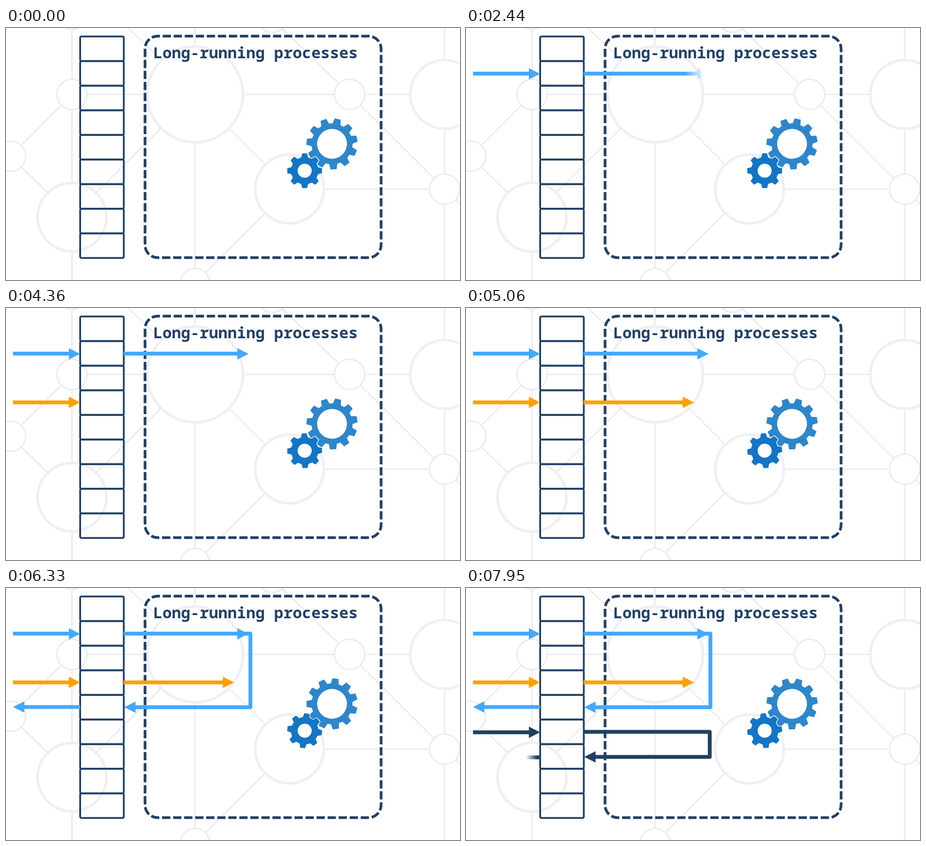
An HTML page for the animation above (8 s loop, 1004 by 558 pixels).

```html
<!DOCTYPE html>
<html lang="en">
<head>
<meta charset="utf-8">
<title>Long-running processes</title>
<style>
  html, body { margin: 0; width: 100%; height: 100%; overflow: hidden; background: #fff; }
  svg { display: block; width: 100%; height: 100%; }
  text { font: bold 34.3px "Noto Sans Mono", "DejaVu Sans Mono", monospace; }
</style>
</head>
<body>
<svg id="stage" viewBox="0 0 1004 558">
  <defs id="defs"></defs>
  <g id="net" fill="none" stroke="#ebebee" stroke-width="3"></g>
  <g id="cells" fill="none" stroke="#214166" stroke-width="4"></g>
  <path d="M307.5 46V480.500a28 28 0 0 0 28 28H801.500a28 28 0 0 0 28-28V46a28 28 0 0 0-28-28H335.500a28 28 0 0 0-28 28Z"
        fill="none" stroke="#214166" stroke-width="6" pathLength="324" stroke-dasharray="3 1"/>
  <text x="325.300" y="67" fill="#214166">Long-running processes</text>
  <g id="gears"></g>
  <g id="arrows"></g>
</svg>
<script>
const LOOP = 8000;
const BLUE = '#44a8ff', ORANGE = '#ffa000', NAVY = '#214060';
const $ = id => document.getElementById(id);

function add(parent, tag, attrs) {
  const el = document.createElementNS('http://www.w3.org/2000/svg', tag);
  for (const k in attrs) el.setAttribute(k, attrs[k]);
  return parent.appendChild(el);
}

// Background network
add($('net'), 'path', { d: `
  M146 3V113M146 181V340M146 498V558M418 0V38M418 256V532M970 0V68M970 226V323M970 391V558
  M181 147H311M527 147H725M795 147H891M705 357H935
  M122 171L35 259M34 308L94 366M345 220L199 365M491 220L574 303M574 409L442 541
  M736 123L609 0M270 0L345 72M784 171L946 333M994 380L1004 390` });
for (const [x, y] of [[146, 147], [10, 284], [760, 147], [970, 357], [418, 566], [589, -24], [146, -31]])
  add($('net'), 'circle', { cx: x, cy: y, r: 33.5 });
for (const [x, y, r] of [[418, 147, 106], [146, 419, 76], [627, 356.5, 76], [970, 147, 76]])
  add($('net'), 'circle', { cx: x, cy: y, r, stroke: '#efeff4', 'stroke-width': 6 });

for (let i = 0; i < 9; i++)
  add($('cells'), 'rect', { x: 164, y: 18.7 + i * 54.5, width: 96.5, height: 54.5, rx: 3 });

// Gears: half-widths of a tooth are angles in degrees
function gear(cx, cy, teeth, outer, root, hole, tip, base, fill) {
  const pts = [];
  const put = (r, deg) => {
    const a = deg * Math.PI / 180;
    pts.push((r * Math.sin(a)).toFixed(2) + ' ' + (-r * Math.cos(a)).toFixed(2));
  };
  for (let i = 0; i < teeth; i++) {
    const a = i * 360 / teeth;
    put(root, a - base); put(outer, a - tip); put(outer, a + tip); put(root, a + base);
  }
  const g = add($('gears'), 'g', {});
  const body = add(g, 'path', { d: 'M' + pts.join('L') + 'Z', fill, 'stroke-linejoin': 'round' });
  add(g, 'circle', { r: hole, fill: '#fff' });
  return { body, turn: deg => g.setAttribute('transform', `translate(${cx} ${cy}) rotate(${deg})`) };
}
const big = gear(721, 256.5, 11, 56.8, 45.5, 33, 6.8, 11.2, '#2e86cb');
const small = gear(660.5, 316, 8, 38.8, 30.5, 15.5, 8, 14.5, '#1375c5');
small.body.setAttribute('stroke', '#fff');
small.body.setAttribute('stroke-width', 3);
small.body.setAttribute('paint-order', 'stroke');

// Soft-edged wipes: from and to are positions along the wipe axis
const wipes = [];
function wipe(start, color, line, tip, from, to, axis = 'x', dur = 405) {
  const id = 'w' + wipes.length, mask = `url(#${id})`;
  const grad = add($('defs'), 'linearGradient', { id: id + 'g', gradientUnits: 'userSpaceOnUse', x1: 0, y1: 0, x2: 0, y2: 0 });
  add(grad, 'stop', { offset: 0, 'stop-color': '#fff' });
  add(grad, 'stop', { offset: 1, 'stop-color': '#000' });
  const m = add($('defs'), 'mask', { id, maskUnits: 'userSpaceOnUse', x: 0, y: 0, width: 1004, height: 558 });
  add(m, 'rect', { width: 1004, height: 558, fill: `url(#${id}g)` });
  const g = add($('arrows'), 'g', {});
  add(g, 'path', { d: line, fill: 'none', stroke: color, 'stroke-width': 8.5, 'stroke-linejoin': 'round' });
  const [x, y, dir] = tip;
  add(g, 'path', { d: `M${x} ${y}l${-25 * dir} -12.500v25z`, fill: color });
  wipes.push({ start, dur, from, to, axis, grad, mask, g });
}
wipe(1000, BLUE, 'M15.5 101H141', [164, 101.5, 1], 15, 164);
wipe(2110, BLUE, 'M260 101H513', [536.5, 101.5, 1], 260, 536);
wipe(3800, ORANGE, 'M15.5 209H141', [164, 209, 1], 15, 164);
wipe(4450, ORANGE, 'M260 209H481', [504.5, 209, 1], 260, 504);
wipe(5400, BLUE, 'M525 101H540.500V264H285', [261.5, 264, -1], 545, 262, 'x', 300);
wipe(5850, BLUE, 'M164 263.500H39', [15.5, 263.5, -1], 164, 15);
wipe(6920, NAVY, 'M15.5 319.500H141', [164, 319.5, 1], 15, 164);
wipe(7420, NAVY, 'M260 318.500H539V374H285', [261.5, 374, -1], 314, 387, 'y');
wipe(7915, NAVY, 'M164 375H39', [15.5, 375, -1], 164, 15);

function drawWipe(w, t) {
  const f = 0.1 + 0.9 * (t - w.start) / w.dur;
  const span = w.to - w.from, fade = span * 0.156;
  const edge = w.from + f * (span + fade);
  w.g.setAttribute('visibility', t >= w.start ? 'visible' : 'hidden');
  w.g.setAttribute('mask', f < 1 ? w.mask : 'none');
  w.grad.setAttribute(w.axis + '1', edge - fade);
  w.grad.setAttribute(w.axis + '2', edge);
}

// Gear travel in teeth at given times
const travel = [[0, 0], [2450, 0], [3310, 1.6], [4360, 3.03], [5730, 5.11], [6940, 6.59], [7950, 8.11], [8000, 8.18]];
function teethAt(t) {
  const i = travel.findIndex(k => k[0] > t);
  const [t0, p0] = travel[i - 1], [t1, p1] = travel[i];
  return p0 + (p1 - p0) * (t - t0) / (t1 - t0);
}

function draw(t) {
  for (const w of wipes) drawWipe(w, t);
  const p = teethAt(t);
  big.turn(12.9 + p * 360 / 11);
  small.turn(-p * 45);
  small.body.setAttribute('stroke-opacity', (1 + Math.cos(2 * Math.PI * p)) / 2);
}

const begin = performance.now();
function tick() {
  draw((performance.now() - begin) % LOOP);
  requestAnimationFrame(tick);
}
tick();
</script>
</body>
</html>
```
